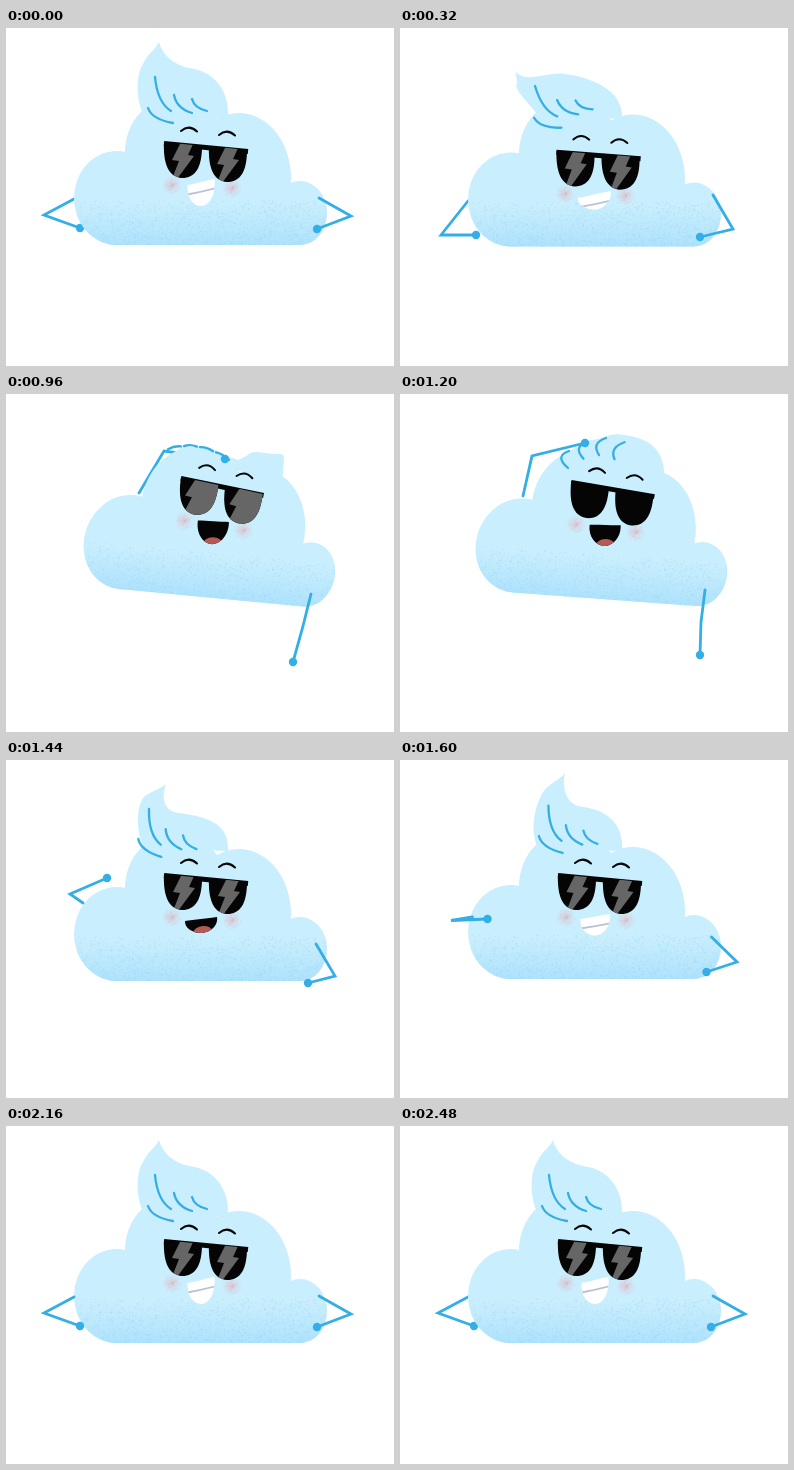
An HTML page with a canvas for the animation above (2.56 s loop, 388 px wide and 338 px high).

```html
<!DOCTYPE html>
<html lang="en">
<head>
<meta charset="utf-8">
<title>Cool cloud</title>
<style>
html, body { margin: 0; width: 100%; height: 100%; overflow: hidden; background: #fff; }
canvas { display: block; }
</style>
</head>
<body>
<canvas id="stage" width="388" height="338"></canvas>
<script>
const ctx = document.getElementById('stage').getContext('2d');
const LOOP = 2560, STEP = 80;
const SKY = '#c9eefd', BLUE = '#34aee6', INK = '#050505', GREY = '#666';

// Four strands fanned out from one corner of the quiff.
function fan(x, y, deg) {
  const a = deg * Math.PI / 180, c = Math.cos(a), s = Math.sin(a);
  const at = (u, v) => [x + u * c - v * s, y + u * s + v * c];
  return [[-7, 31, 25, 15], [0, 0, 16, 34], [19, 18, 18, 18], [37, 22, 15, 12]].flatMap(([u, v, w, h]) =>
    [...at(u, v), ...at(u + .15 * w, v + .75 * h), ...at(u + w, v + h)]);
}

// Strands lying side by side under the hand.
const combed = () => [0, 1, 2, 3].flatMap(i => {
  const x = 169 + 18.5 * i, y = 57 - 13 * Math.sin(i * .8);
  return [x, y, x - 15, y + 5, x - 1 - 3 * i, y + 17];
});

// Strands pressed flat along the head.
const flattened = () => [0, 1, 2, 3].flatMap(i => {
  const x = 162 + 16 * i, top = v => 52 + ((v - 182) / 11) ** 2;
  return [x, top(x), x + 6, top(x + 6) - 2, x + 13, top(x + 13)];
});

// body: lean, drop; face: x, y, degrees; mouth: width, tilt, depth; glint: left and right edge shift;
// hair: side, tip, crown; arms: shoulder, elbow, hand.
const rest = {
  body: [0, 0], face: [200, 117, 0], mouth: [27, -6, 24], glint: [0, 0],
  hair: [137,36, 153,14, 183,40], curl: [1], strands: fan(149, 49, 0),
  left: [68,171, 38,187, 74,200], right: [313,170, 345,188, 311,201]
};
const crouch = { ...rest,
  body: [0, 1.5], face: [198.5, 125, -1], mouth: [33, -6, 15],
  hair: [117,55, 116,44, 165,46], strands: fan(135, 58, -11),
  left: [68,173, 41,207, 76,207], right: [313,167, 333,201, 300,209]
};
const comb = {
  body: [1, 0], face: [213, 93, 4.3], mouth: [31, -2, 21], glint: [-35, 40],
  hair: [163,62, 190,46, 224,41], curl: [0], strands: combed(),
  left: [123,102, 132,62, 185,49], right: [305,196, 301,228, 300,261]
};
const swept = {
  body: [1.3, 2], face: [216.5, 90.5, 6.3], mouth: [31, -2, 23], glint: [-2, 40],
  hair: [178,51, 232,66, 258,59], curl: [-.5], strands: flattened(),
  left: [133,99, 158,57, 219,65], right: [305,200, 296.5,234, 287,268]
};
const release = { ...rest,
  body: [0, 4], mouth: [32, -4, 14], glint: [81, 81],
  hair: [137,38, 160,24, 172,53], strands: fan(143, 49, 7),
  left: [77,143, 64,134, 101,118], right: [310,184, 329,216, 302,223]
};

// The resting pose with the quiff swaying and stretching upwards.
const sway = (s, lift = 0) => ({ ...rest, glint: [80, 80],
  hair: [137 + 10 * s, 36 - 4 * s - lift / 2, 153 + 14 * s, 14 - 3 * s - lift, 183 + 5 * s, 40],
  strands: fan(149 + 4 * s, 49 - 3 * s - lift / 3, 2 * s)
});

const keys = [[0, rest], [80, rest], [320, crouch], [640, comb], [960, swept], [1200, { ...comb, glint: [30, 40] }],
  [1440, release], [1760, sway(1.2, 9)], [1840, sway(1)], [2000, sway(-.2)], [2160, sway(0)], [LOOP, sway(0)]];

function poseAt(t) {
  const i = keys.findIndex(k => k[0] > t);
  const [t0, a] = keys[i - 1], [t1, b] = keys[i];
  let u = (t - t0) / (t1 - t0);
  u = u * u * (3 - 2 * u);
  const pose = {};
  for (const name in a) pose[name] = a[name].map((v, j) => v + (b[name][j] - v) * u);
  return pose;
}

function seeded(seed) {
  return () => (seed = (seed * 16807) % 2147483647) / 2147483647;
}
const rnd = seeded(42);
const grain = Array.from({ length: 1500 }, () => [66 + rnd() * 258, 218 - 46 * rnd() ** 1.7]);
const blush = Array.from({ length: 60 }, () => {
  const a = rnd() * Math.PI * 2, r = rnd() * 9;
  return [Math.cos(a) * r, Math.sin(a) * r];
});

function puffs() {
  const path = new Path2D();
  for (const [x, y, rx, ry] of [[111, 170, 43, 47], [170, 124, 51, 55], [233, 150, 52, 65], [294, 185, 27, 32]]) {
    path.moveTo(x + rx, y);
    path.ellipse(x, y, rx, ry, 0, 0, Math.PI * 2);
  }
  path.rect(111, 172, 183, 45);
  return path;
}
const puff = puffs();

function cloud([lean, drop]) {
  ctx.save();
  ctx.transform(1, .073 * lean, -.12 * lean, 1, 28.2 * lean, drop - 26.5 * lean);
  ctx.fillStyle = SKY;
  ctx.fill(puff);
  ctx.clip(puff);
  const shade = ctx.createLinearGradient(0, 176, 0, 218);
  shade.addColorStop(0, 'rgba(170,224,252,0)');
  shade.addColorStop(1, 'rgba(170,224,252,.85)');
  ctx.fillStyle = shade;
  ctx.fillRect(60, 176, 270, 44);
  ctx.fillStyle = 'rgba(155,216,250,.4)';
  for (const [x, y] of grain) ctx.fillRect(x, y, 1.2, 1.2);
  ctx.restore();
}

function quiff([sx, sy, tx, ty, cx, cy], curl, lean) {
  const rx = 138 + 18 * lean, ry = 88 - 16 * lean;
  const ex = 222 + 42 * lean, ey = 91 - 6 * lean;
  const h = ry - sy, dx = tx - sx, dy = ty - sy;
  ctx.fillStyle = SKY;
  ctx.beginPath();
  ctx.moveTo(rx, ry);
  ctx.bezierCurveTo(rx - .16 * h, ry - .32 * h, sx - .14 * h, sy + .22 * h, sx, sy);
  ctx.bezierCurveTo(sx + .3 * dx, sy + .5 * dy, tx - .25 * dx, ty - .4 * dy, tx, ty);
  ctx.bezierCurveTo(tx + .4 * (cx - tx) - 9 * curl, ty + 12 * curl, cx - 16, cy - 3, cx, cy);
  ctx.bezierCurveTo(cx + 24, cy + 3, ex + 2, ey - 30, ex, ey);
  ctx.fill();
}

function poly(p) {
  ctx.beginPath();
  for (let i = 0; i < p.length; i += 2) ctx.lineTo(p[i], p[i + 1]);
}

function arcs(p, color, width) {
  ctx.strokeStyle = color;
  ctx.lineWidth = width;
  ctx.beginPath();
  for (let i = 0; i < p.length; i += 6) {
    ctx.moveTo(p[i], p[i + 1]);
    ctx.quadraticCurveTo(...p.slice(i + 2, i + 6));
  }
  ctx.stroke();
}

function arm(p) {
  ctx.strokeStyle = BLUE;
  ctx.lineWidth = 2.8;
  poly(p);
  ctx.stroke();
}

function hand(p) {
  ctx.fillStyle = BLUE;
  ctx.beginPath();
  ctx.arc(p[4], p[5], 4.2, 0, 7);
  ctx.fill();
}

// Runs a drawing for the left side of the face, then for the right.
function bothSides(dx, dy, paint) {
  for (const side of [0, 1]) {
    ctx.save();
    ctx.translate(dx * side, dy * side);
    paint();
    ctx.restore();
  }
}

const lens = new Path2D('M158 114L196 118C196 140 189 150 176 150C162 149 157 135 158 114Z');

function bolt(l, r) {
  poly([175 + l,114, 166 + l,132, 173 + l,133, 166 + l,151, 171 + r,151, 188 + r,128, 182 + r,127, 188 + r,114]);
  ctx.fill();
}

function glasses([l, r]) {
  ctx.lineCap = 'butt';
  arcs([158,115.5, 200,119.5, 242,123.5], INK, 5);
  ctx.lineCap = 'round';
  bothSides(45, 4, () => {
    ctx.fillStyle = INK;
    ctx.fill(lens);
    ctx.clip(lens);
    ctx.fillStyle = GREY;
    bolt(l, r);
    bolt(l - 80, r - 80);
  });
}

function mouth([w, tilt, depth], open) {
  const x = 195, y = 166 - depth / 2;
  const lx = x - w / 2, ly = y - tilt / 2, rx = x + w / 2, ry = y + tilt / 2, by = y + depth;
  ctx.save();
  ctx.beginPath();
  ctx.moveTo(lx, ly);
  ctx.bezierCurveTo(lx + 9, ly - 1, rx - 9, ry + 1, rx, ry);
  ctx.bezierCurveTo(rx + 1.5, ry + (by - ry) * .6, x + 8, by, x, by);
  ctx.bezierCurveTo(x - 8, by, lx - .5, ly + (by - ly) * .6, lx, ly);
  ctx.fillStyle = open ? INK : '#fff';
  ctx.fill();
  ctx.clip();
  if (open) {
    ctx.fillStyle = '#b25a56';
    ctx.beginPath();
    ctx.ellipse(x + 2, by, 10, 7, -.1, 0, 7);
    ctx.fill();
  } else {
    arcs([lx, ly + 9.5, x, y + 10, rx + 2, ry + 9], '#b9c1d2', 1.8);
  }
  ctx.restore();
}

function cheek() {
  ctx.translate(166, 157);
  const glow = ctx.createRadialGradient(0, 0, 1, 0, 0, 10);
  glow.addColorStop(0, 'rgba(222,194,206,.65)');
  glow.addColorStop(1, 'rgba(222,204,216,0)');
  ctx.fillStyle = glow;
  ctx.fillRect(-10, -10, 20, 20);
  ctx.fillStyle = 'rgba(218,178,192,.3)';
  for (const [x, y] of blush) ctx.fillRect(x, y, 1, 1);
}

function face(pose, open) {
  const [x, y, deg] = pose.face;
  ctx.save();
  ctx.translate(x, y);
  ctx.rotate(deg * Math.PI / 180);
  ctx.translate(-200, -117);
  bothSides(60, 3, cheek);
  bothSides(38, 4, () => arcs([175,103, 183,96, 191,103.5], INK, 2));
  glasses(pose.glint);
  mouth(pose.mouth, open);
  ctx.restore();
}

function sparkle(size) {
  if (size <= 0) return;
  const r = 6.5 * size;
  ctx.save();
  ctx.translate(144, 115);
  ctx.fillStyle = ctx.strokeStyle = '#fff';
  ctx.lineWidth = 1.2;
  ctx.beginPath();
  ctx.moveTo(0, -r);
  for (const [x, y] of [[r, 0], [0, r], [-r, 0], [0, -r]]) ctx.quadraticCurveTo(0, 0, x, y);
  ctx.fill();
  ctx.stroke();
  ctx.restore();
}

function draw(t) {
  const pose = poseAt(t);
  const tucked = t < 400 || t > 2240;
  const behind = tucked || (t >= 800 && t < 1120);
  ctx.fillStyle = '#fff';
  ctx.fillRect(0, 0, 388, 338);
  ctx.lineCap = 'round';
  if (behind) arm(pose.left);
  if (tucked) hand(pose.left);
  cloud(pose.body);
  quiff(pose.hair, pose.curl[0], pose.body[0]);
  arcs(pose.strands, BLUE, 2.3);
  if (!behind) arm(pose.left);
  if (!tucked) hand(pose.left);
  face(pose, t >= 480 && t < 1600);
  arm(pose.right);
  hand(pose.right);
  sparkle(1 - Math.abs(t - 1840) / 200);
}

function tick() {
  draw(Math.floor(performance.now() % LOOP / STEP) * STEP);
  requestAnimationFrame(tick);
}
tick();
</script>
</body>
</html>
```
